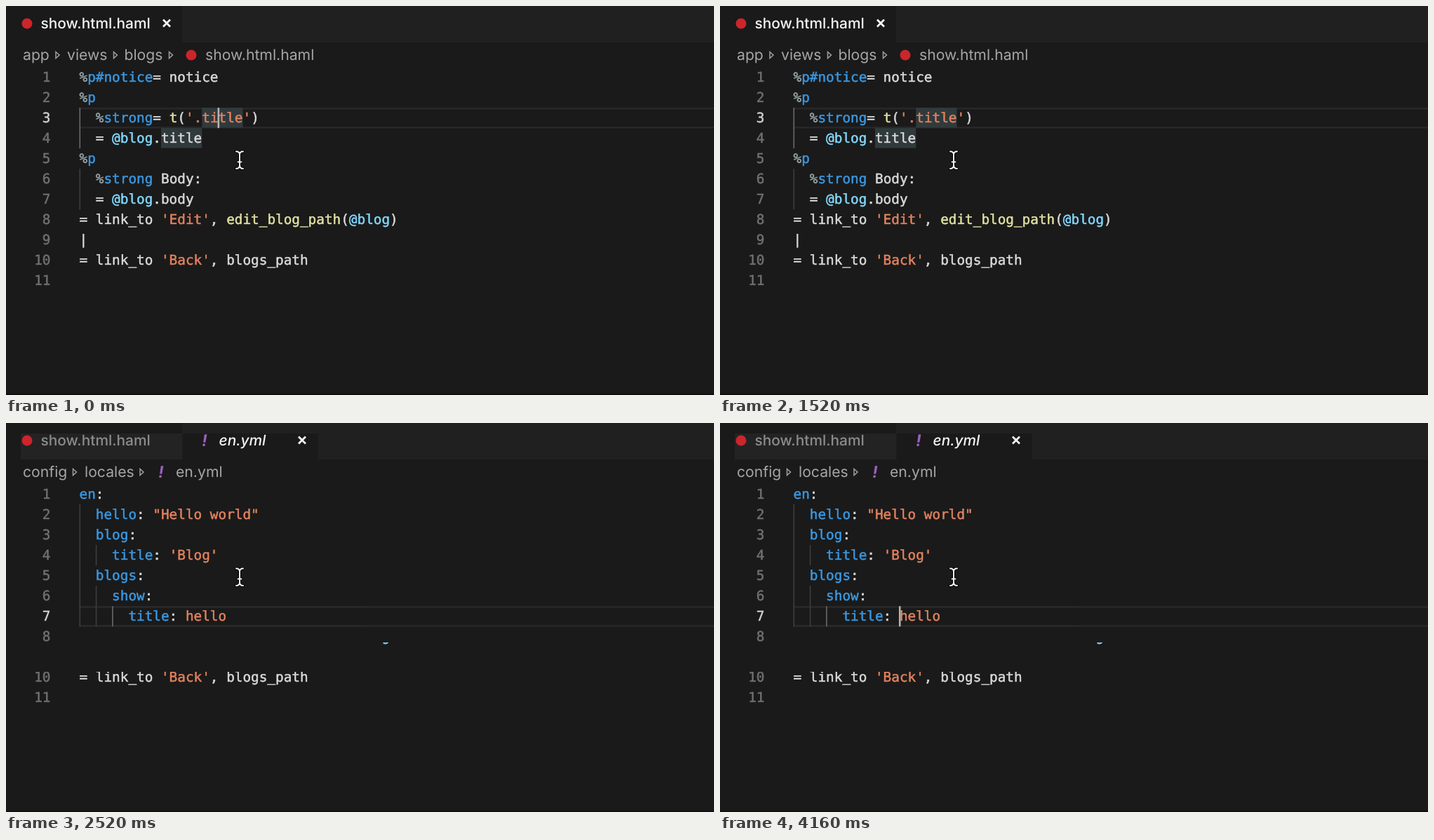
Write an HTML page that moves like this. It is 1009 by 555 pixels and loops after 4220 ms.

```html
<!DOCTYPE html>
<html lang="en">
<head>
<meta charset="utf-8">
<title>Editor tabs</title>
<style>
  html, body { margin: 0; width: 100%; height: 100%; overflow: hidden; background: #1a1a1a; }
  svg { display: block; }
  text { white-space: pre; text-rendering: geometricPrecision; }
  text, tspan { fill: currentColor; stroke: currentColor; stroke-width: 0; }
  .code, .code tspan { font: 19.35px "DejaVu Sans Mono", monospace; stroke-width: 0.5px; }
  .ui { font: 21.2px Inter, sans-serif; }
  .tab { font-weight: 500; font-size: 20.9px; }
  .slant { font-style: italic; }
  .mark { font: italic 700 23px Inter, sans-serif; }
  .w { color: #dadada; }
  .g { color: #98a3a8; }
  .b { color: #3a98e2; }
  .o { color: #e3825f; }
  .y { color: #e2e2a2; }
  .v { color: #82d9fe; }
</style>
</head>
<body>
<svg width="1009" height="555" viewBox="0 0 1009 555">
  <defs>
    <path id="beam" d="M328 207.5q5 0 5 4.500q0-4.500 5-4.500M333 212V227M328 232q5 0 5-5q0 5 5 5M330.500 222.500h5"/>
  </defs>
  <rect width="1009" height="555" fill="#1a1a1a"/>
  <g id="haml"></g>
  <g id="yml"></g>
  <g fill="none" stroke-linecap="round">
    <use href="#beam" stroke="#000" stroke-width="4"/>
    <use href="#beam" stroke="#f2f2f2" stroke-width="2"/>
  </g>
  <rect y="553" width="1009" height="2" fill="#101010"/>
</svg>
<script>
const LEFT = 104.5, PITCH = 11.65, ROW = 29.05, LOOP = 4220;
const GREY = "#a6a6a6", WHITE = "#f4f4f4", PURPLE = "#9a5fc0";
const rowTop = n => 87 + (n - 1) * ROW;

const rect = (x, y, w, h, fill, extra = "") =>
  `<rect x="${x}" y="${y}" width="${w}" height="${h}" fill="${fill}" ${extra}/>`;
const label = (x, y, text, color, cls = "ui", extra = "") =>
  `<text x="${x}" y="${y}" color="${color}" class="${cls}" ${extra}>${text}</text>`;
const dot = (x, y) => `<circle cx="${x}" cy="${y}" r="7.5" fill="#cc252b"/>`;
const chevron = x => `<path d="M${x} 65.500l5 4.500l-5 4.500z" fill="none" stroke="#a0a0a0" stroke-width="1.500"/>`;
const close = x => `<path d="M${x - 5} 19.500l10 10m0-10l-10 10" stroke="${WHITE}" stroke-width="2.800"/>`;
const lineBox = (n, right) =>
  [rowTop(n), rowTop(n) + ROW - 2].map(y => rect(LEFT, y, right - LEFT, 2.4, "#282828")).join("");
const guide = (col, from, to, fill = "#3e3e3e") =>
  rect(LEFT + col * PITCH, rowTop(from), 1.6, (to - from + 1) * ROW, fill);
const caret = (col, n) => rect(LEFT + col * PITCH - 1, rowTop(n), 2.6, ROW, "#b4b4b0", 'class="caret"');
const wordBox = (col, n) => rect(LEFT + col * PITCH, rowTop(n), 5 * PITCH, ROW - 0.5, "#303a3d");

// Rows are runs of "~" + colour class + text.
const code = (rows, active) => rows.map((row, i) => {
  const y = rowTop(i + 1) + 20.9;
  const runs = row.split("~").slice(1).map(r => `<tspan class="${r[0]}">${r.slice(1)}</tspan>`).join("");
  return label(63.5, y, i + 1, i + 1 === active ? "#d0d0d0" : "#707070", "code", 'text-anchor="end"') +
    label(LEFT, y, runs, "#dadada", "code");
}).join("");

const haml = document.getElementById("haml"), yml = document.getElementById("yml");

haml.innerHTML =
  rect(251, 0, 758, 52, "#202020") +
  dot(30, 25) + label(49.5, 32, "show.html.haml", WHITE, "ui tab") + close(229) +
  label(24, 77, "app", GREY) + chevron(71) + label(87, 77, "views", GREY) + chevron(153.5) +
  label(168.5, 77, "blogs", GREY) + chevron(232.5) + dot(264, 70) + label(284, 77, "show.html.haml", GREY) +
  lineBox(3, 1009) + wordBox(15, 3) + wordBox(10, 4) +
  guide(0, 3, 4, "#6a6a6a") + guide(0, 6, 7) +
  code([
    "~g%~bp#notice~w= notice",
    "~g%~bp",
    "~g  %~bstrong~w= ~yt~w(~o'.title'~w)",
    "~w  = ~v@blog~w.title",
    "~g%~bp",
    "~g  %~bstrong~w Body:",
    "~w  = ~v@blog~w.body",
    "~w= link_to ~o'Edit'~w, ~yedit_blog_path~w(~v@blog~w)",
    "~w|",
    "~w= link_to ~o'Back'~w, blogs_path",
    "~w"
  ], 3) + caret(17, 3);

// The second file repaints only part of the window, then more of it.
yml.innerHTML =
  rect(21, 15, 488, 340, "#1a1a1a") +
  rect(21, 15, 230.5, 37, "#232323") + rect(445, 15, 64, 37, "#202020") +
  `<g id="rest"><path d="M509 52H1009V316H547V313H509z" fill="#1a1a1a"/>${lineBox(7, 1009)}</g>` +
  lineBox(7, 509) +
  dot(30, 25) + label(49.5, 32, "show.html.haml", "#8c8c8c", "ui tab") +
  label(279, 33, "!", PURPLE, "mark") +
  label(303.5, 32, "en.yml", WHITE, "ui tab slant") + close(422) +
  label(24, 77, "config", GREY) + chevron(95.5) + label(112, 77, "locales", GREY) + chevron(191) +
  label(217, 78, "!", PURPLE, "mark") + label(242, 77, "en.yml", GREY) +
  guide(0, 2, 7) + guide(2, 4, 4) + guide(2, 6, 7) + guide(4, 7, 7, "#6a6a6a") +
  code([
    "~ben~w:",
    "~b  hello~w: ~o\"Hello world\"",
    "~b  blog~w:",
    "~b    title~w: ~o'Blog'",
    "~b  blogs~w:",
    "~b    show~w:",
    "~b      title~w: ~ohello",
    "~w"
  ], 7) + caret(13, 7);

const rest = document.getElementById("rest");
const carets = document.querySelectorAll(".caret");
const caretOn = [[0, 240], [840, 1420], [1800, 2360], [2980, 3560], [4160, LOOP]];
const show = (el, on) => { el.style.display = on ? "" : "none"; };

function draw(now) {
  const t = now % LOOP;
  const lit = caretOn.some(([a, b]) => t >= a && t < b);
  carets.forEach(c => show(c, lit));
  show(yml, t >= 1800);
  show(rest, t >= 2400);
}

const start = performance.now();
function tick() {
  draw(performance.now() - start);
  requestAnimationFrame(tick);
}
tick();
</script>
</body>
</html>
```
